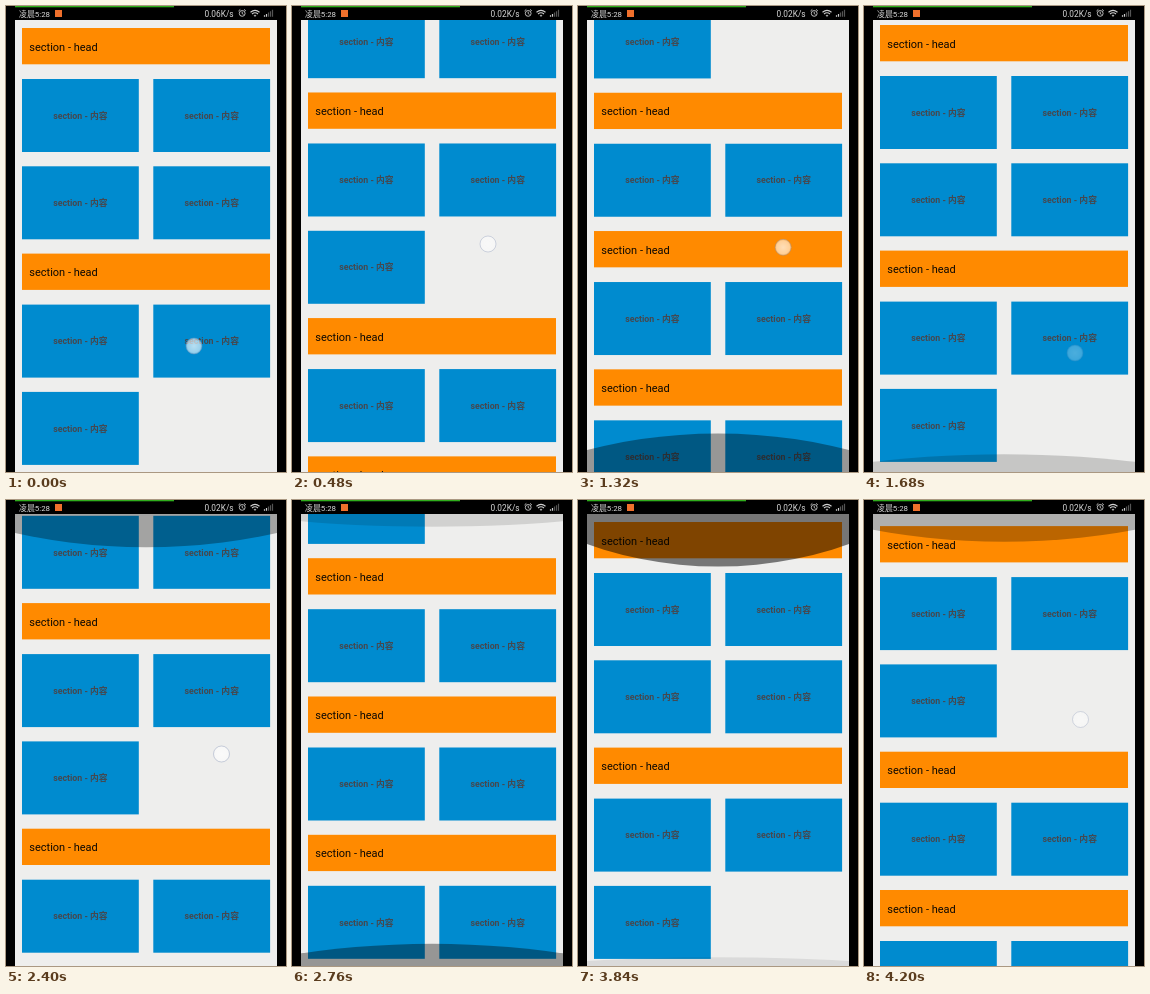
These frames come from a looping animation (280 by 466 pixels, 4320 ms). An HTML page:

```html
<!DOCTYPE html>
<html lang="zh">
<head>
<meta charset="utf-8">
<style>
html, body { margin: 0; width: 100%; height: 100%; overflow: hidden; background: #000; }
svg { display: block; width: 280px; height: 466px; }
text { font-family: Roboto, "Noto Sans CJK SC", "Noto Sans CJK", sans-serif; }
.head { font-size: 11px; fill: #0c0803; }
.item { font-size: 8.8px; font-weight: 700; fill: #45484f; text-anchor: middle; }
.bar { fill: #d8d8d8; }
.line { fill: none; stroke: #d0d0d0; }
</style>
</head>
<body>
<svg viewBox="0 0 280 466">
  <defs>
    <clipPath id="view"><rect x="9" y="14" width="262" height="452"/></clipPath>
    <radialGradient id="dot">
      <stop offset="0" stop-color="#fff" stop-opacity=".72"/>
      <stop offset=".8" stop-color="#fff" stop-opacity=".6"/>
      <stop offset="1" stop-color="#fff" stop-opacity=".4"/>
    </radialGradient>
  </defs>
  <rect width="280" height="466"/>
  <g clip-path="url(#view)">
    <rect x="9" y="14" width="262" height="452" fill="#eeeeed"/>
    <g id="list"></g>
    <ellipse id="topGlow" cx="140" rx="393"/>
    <ellipse id="endGlow" cx="140" rx="393"/>
    <circle id="touch" r="8" fill="url(#dot)" stroke="#8292b4" stroke-opacity=".5" stroke-width=".8"/>
  </g>
  <rect x="9" width="159" height="1.3" fill="#2fae1c"/>
  <text class="bar" x="13" y="10.6" font-size="7.9">凌晨5:28</text>
  <rect x="49" y="4" width="7" height="7" fill="#f0702c"/>
  <text id="speed" class="bar" x="198.5" y="10.8" font-size="8.3"></text>
  <g class="line" stroke-width=".9">
    <circle cx="236.2" cy="7.4" r="2.9"/>
    <path d="M236.2 5.7v1.9l1.3.8M232.5 5l1.8-1.6M239.9 5l-1.8-1.6"/>
  </g>
  <g class="line" stroke-width="1.1">
    <path d="M244.5 6.2q4.5-3.6 9 0M246 8q3-2.4 6 0"/>
    <path d="M248 9.3h2l-1 1.3z" fill="#d0d0d0" stroke-width=".5"/>
  </g>
  <path d="M258.5 10.8v-1.6M260.5 10.8v-2.8" stroke="#d0d0d0" stroke-width="1.2"/>
  <path d="M262.5 10.8v-4.2M264.5 10.8v-5.6M266.5 10.8v-7" stroke="#555" stroke-width="1.2"/>
</svg>
<script>
const LOOP = 4320, STEP = 120;
const NS = "http://www.w3.org/2000/svg";
const $ = id => document.getElementById(id);
const list = $("list");

function set(el, attrs) {
  for (const k in attrs) el.setAttribute(k, attrs[k]);
  return el;
}
function add(tag, attrs, text) {
  const el = set(document.createElementNS(NS, tag), attrs);
  if (text) el.textContent = text;
  list.appendChild(el);
}

// Item count of each section
let y = 22;
for (const count of [4, 3, 2, 2, 2]) {
  add("rect", { x: 16, y, width: 248, height: 36.3, fill: "#ff8a00" });
  add("text", { class: "head", x: 23.3, y: y + 22.6 }, "section - head");
  y += 51;
  for (let i = 0; i < count; i++) {
    const x = 16 + i % 2 * 131.3, top = y + (i >> 1) * 87.3;
    add("rect", { x, y: top, width: 116.8, height: 73, fill: "#008bcf" });
    add("text", { class: "item", x: x + 58.4, y: top + 39.7 }, "section - 内容");
  }
  y += Math.ceil(count / 2) * 87.3;
}

// [time, scroll offset, easing power of the segment ending here]
const scroll = [
  [0, 0], [200, 0], [430, 110, 1.5], [720, 406.5], [760, 415],
  [1250, 415], [1480, 245, 1.5], [1680, 3], [1690, 0],
  [2180, 0], [2400, 144.5, 1.5], [2680, 415],
  [3060, 415], [3230, 285, 1.5], [3360, 103], [3435, 0],
  [3930, 0], [4120, 140, 1.5], [4200, 221.5], [LOOP, 320]
];
// [press, release, x0, y0, x1, y1]
const swipes = [
  [200, 430, 188, 340, 196, 238],
  [1250, 1480, 204, 220, 211, 347],
  [2180, 2400, 211, 394, 215.5, 254],
  [3060, 3230, 214, 245, 205.5, 381],
  [3930, 4120, 208, 370, 216.5, 219.5]
];
// [time the edge is hit, peak height]
const topHits = [[1700, 63], [3440, 60]];
const endHits = [[790, 52.6], [2690, 60]];

const lerp = (a, b, p) => a + (b - a) * p;
const clamp = p => Math.min(1, Math.max(0, p));

function offsetAt(t) {
  const i = scroll.findIndex(k => k[0] > t);
  const [t0, a] = scroll[i - 1], [t1, b, power = 1] = scroll[i];
  return lerp(a, b, ((t - t0) / (t1 - t0)) ** power);
}

function drawGlow(el, hits, t, atEnd) {
  const hit = hits.filter(h => h[0] <= t).pop();
  let h = 0, alpha = 0;
  if (hit) {
    const age = t - hit[0];
    if (age < 340) {
      const u = 1 - (1 - age / 340) ** 2;
      h = hit[1] * u;
      alpha = .3 + .2 * u;
    } else {
      h = hit[1] * clamp((1650 - age) / 1310) ** 2;
      alpha = Math.min(.5, h * .0096);
    }
  }
  h = Math.min(h, 52.6);
  const ry = h * 393 / 52.6;
  set(el, { cy: atEnd ? 466 - h + ry : 14 + h - ry, ry, opacity: h < 1 ? 0 : alpha });
}

function drawTouch(t) {
  const s = swipes.find(s => t >= s[0] - 200 && t < s[1] + 340);
  // A finger rests before it moves only on the first swipe
  if (!s || (t < s[0] && s !== swipes[0])) return set($("touch"), { opacity: 0 });
  const p = clamp((t - s[0]) / (s[1] - s[0])) ** 1.5;
  set($("touch"), {
    cx: lerp(s[2], s[4], p),
    cy: lerp(s[3], s[5], p),
    opacity: 1 - clamp((t - s[1]) / 340)
  });
}

function draw(ms) {
  const t = Math.floor(ms % LOOP / STEP) * STEP;
  set(list, { transform: `translate(0 ${-offsetAt(t)})` });
  drawGlow($("topGlow"), topHits, t, false);
  drawGlow($("endGlow"), endHits, t, true);
  drawTouch(t);
  $("speed").textContent = t < 360 ? "0.06K/s" : "0.02K/s";
}

const start = performance.now();
function tick() {
  draw(performance.now() - start);
  requestAnimationFrame(tick);
}
tick();
</script>
</body>
</html>
```
